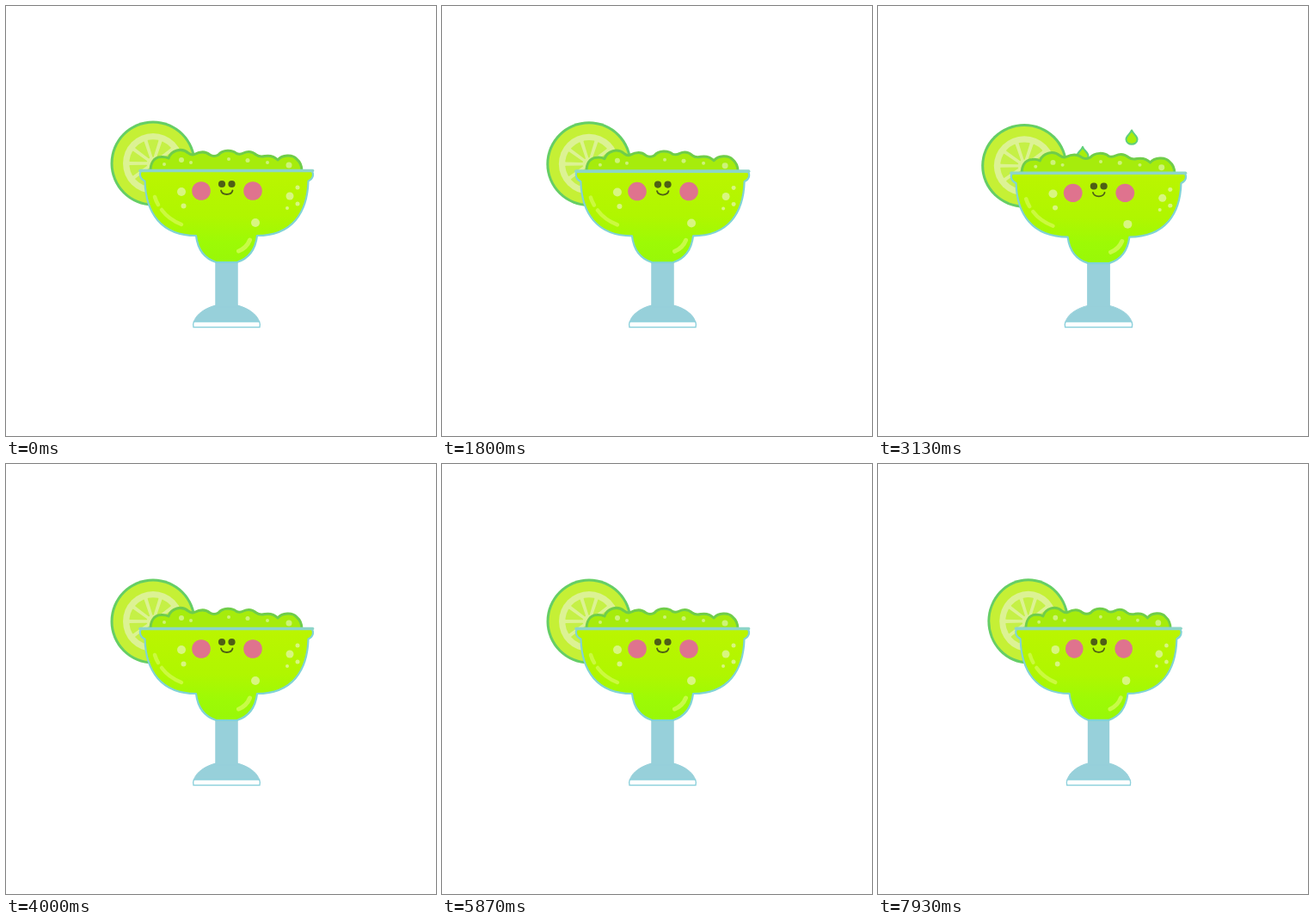
Animation, 500 px wide and 500 px high, one loop 8000 ms. Source, as an HTML page with a canvas:

```html
<!DOCTYPE html>
<html lang="en">
<head>
<meta charset="utf-8">
<title>Happy margarita</title>
<style>
  html, body { margin: 0; width: 100%; height: 100%; overflow: hidden; background: #fff; }
  canvas { display: block; width: 100vmin; height: 100vmin; }
</style>
</head>
<body>
<canvas id="stage" width="500" height="500"></canvas>
<script>
const ctx = document.getElementById('stage').getContext('2d');
const LOOP = 8000, CYCLE = 5267;
const MID = 256.5, FLOOR = 374;
const PALE = '#d7f08e', GLASS = '#80d3d5', EDGE = '#65ce65';

// time, horizontal scale, vertical scale
const POSES = [
  [0, 1, 1], [1650, 1, 1], [1760, 1, 1], [2270, 1.072, .812], [2400, 1.06, .848],
  [2533, 1.042, .895], [2600, 1.022, .94], [2663, .957, 1], [2750, .945, 1.05],
  [2900, .99, 1.005], [3010, 1.025, .965], [3130, 1.01, .985], [3270, 1, 1],
  [3400, 1, 1], [CYCLE, 1, 1]
];

const clamp = v => Math.max(0, Math.min(1, v));
const mix = (a, b, k) => `rgb(${a.map((v, i) => Math.round(v + (b[i] - v) * k))})`;

function slope(i, c) {
  if (i === 0 || i === POSES.length - 1) return 0;
  const a = POSES[i - 1], p = POSES[i], b = POSES[i + 1];
  if ((p[c] - a[c]) * (b[c] - p[c]) <= 0) return 0;
  return (b[c] - a[c]) / (b[0] - a[0]);
}

function pose(t, c) {
  let i = 0;
  while (i < POSES.length - 2 && t >= POSES[i + 1][0]) i++;
  const a = POSES[i], b = POSES[i + 1], d = b[0] - a[0], u = (t - a[0]) / d;
  const s = u * u * (3 - 2 * u);
  return a[c] + (b[c] - a[c]) * s
    + d * u * (1 - u) * ((1 - u) * slope(i, c) - u * slope(i + 1, c));
}

function shape(path, fill, stroke, width) {
  const p = path instanceof Path2D ? path : new Path2D(path);
  if (fill) { ctx.fillStyle = fill; ctx.fill(p); }
  if (stroke) { ctx.strokeStyle = stroke; ctx.lineWidth = width; ctx.stroke(p); }
}

function oval(x, y, rx, fill, ry = rx) {
  const p = new Path2D();
  p.ellipse(x, y, rx, ry, 0, 0, 7);
  shape(p, fill);
}

const dots = (list, fill) => list.forEach(([x, y, r]) => oval(x, y, r, fill));

function lime() {
  const x = 171, y = 183;
  oval(x, y, 49.5, EDGE);
  oval(x, y, 46.5, '#c5f035');
  oval(x, y, 35, '#dcf294');
  const n = 10;
  for (let i = 0; i < n; i++) {
    const a = (i + .5) / n * Math.PI * 2, p = new Path2D();
    const at = (r, b) => [x + r * Math.cos(b), y + r * Math.sin(b)];
    p.moveTo(...at(8, a));
    p.lineTo(...at(27, a - .21));
    p.arc(x, y, 27, a - .21, a + .21);
    p.closePath();
    shape(p, '#c5f046', '#c5f046', 1.5);
  }
}

function drop(x, y) {
  shape(`M${x} ${y - 9}C${x + 2} ${y - 4} ${x + 7} ${y - 2} ${x + 6.5} ${y + 2}
    C${x + 6} ${y + 9} ${x - 6} ${y + 9} ${x - 6.5} ${y + 2}
    C${x - 7} ${y - 2} ${x - 2} ${y - 4} ${x} ${y - 9}Z`, '#a8ee0c', '#5fcf7c', 2);
}

function drops(t) {
  // x, landing drift, top of flight, time of the top
  for (const [x, drift, top, peak] of [[295, .025, 101, 2950], [238, -.02, 115, 2941]]) {
    const y = top + .0016 * (t - peak) ** 2;
    if (y < 185) drop(x + drift * (t - 3130), y);
  }
}

function slush() {
  shape(`M168 192C168 184 171 176 180 175.5Q185 175 189 177C192 168 204 164 212 171
    Q216 174 219 172.5Q230 167 237 173Q242 176 247 173C252 167 263 167 268 171.5
    Q272 173 276 171Q284 167 291 173Q295 176 301 174.5Q310 173 316 179
    C321 173 333 172 338 178Q344 183 344 192Z`, '#a6ec0c', '#6fcd4a', 3);
  dots([[204, 179, 3], [215, 182, 2], [184, 184, 2], [259, 178, 2],
    [281, 179.5, 2.5], [304, 182, 2], [329, 185, 3.5]], '#cdf379');
}

function stem(fade) {
  const blue = '#97d0da';
  shape('M244 348C232 351 221 358 218 368H295C292 358 281 351 269 348Z', blue, blue, 1);
  shape('M244 297H269V350H244Z', mix([151, 208, 218], [206, 234, 150], fade), blue, 1.5);
  if (fade > .3) {
    ctx.globalAlpha = fade;
    shape('M248 306H254V346H248Z', '#97d0da');
    ctx.globalAlpha = 1;
  }
  shape('M218.5 367H294.5Q296 370 295 373.5H218Q217 370 218.5 367Z', '#fff', '#8ed1dc', 1.4);
}

function bowl() {
  const g = ctx.createLinearGradient(0, 190, 0, 298);
  g.addColorStop(0, '#bbf500');
  g.addColorStop(.5, '#b0f600');
  g.addColorStop(.78, '#9dfa05');
  g.addColorStop(1, '#98f808');
  shape(`M157 191.5H355.5C358.5 196 357 201 351.5 203.5C350.5 240 333 267 292 267
    C290 284 281 294 268.5 298H244.5C232 294 223 284 221 267
    C180 267 162.500 240 161.500 203.5C156 201 154.500 196 157 191.5Z`, g, GLASS, 2.2);
  shape('M156 191.500H356.500', null, '#8dd5c8', 3.6);
  shape('M173 222Q174.500 227 177 231M181 237Q189 248 204 254', null, '#cbf93f', 4.5);
  shape('M270.500 285Q280 281 283.500 272', null, '#c8fa48', 5);
  dots([[204, 216, 5], [206.5, 232.5, 3], [290, 252, 5], [330, 221, 4.5],
    [339, 211, 2.5], [339, 230, 2.5], [327, 235, 2]], '#d8f680');
}

function face(t, fade) {
  const ink = mix([78, 95, 22], [140, 188, 32], fade);
  const shut = clamp(1 - Math.max(0, Math.abs(t - 1070) - 30) / 70);
  oval(227, 215, 10.8, '#df738e');
  oval(287, 215, 10.8, '#df738e');
  for (const x of [251, 262.5]) oval(x, 207, 4.1, ink, 4.1 - 2.4 * shut);
  shape('M250 214.500C251.500 220.500 262 220.500 263.500 214.500', null, ink, 1.8);
}

function draw(now) {
  const t = (now % LOOP) % CYCLE;
  const sy = pose(t, 2), fade = clamp((.9 - sy) / .045);
  ctx.setTransform(1, 0, 0, 1, 0, 0);
  ctx.fillStyle = '#fff';
  ctx.fillRect(0, 0, 500, 500);
  ctx.lineCap = ctx.lineJoin = 'round';

  const pin = () => {
    ctx.translate(MID, FLOOR);
    ctx.scale(pose(t, 1), sy);
    ctx.translate(-MID, -FLOOR);
  };
  ctx.save();
  pin();
  lime();
  ctx.restore();
  drops(t);
  pin();
  slush();
  stem(fade);
  bowl();
  face(t, fade);
}

const start = performance.now();
function tick() {
  draw(performance.now() - start);
  requestAnimationFrame(tick);
}
tick();
</script>
</body>
</html>
```
